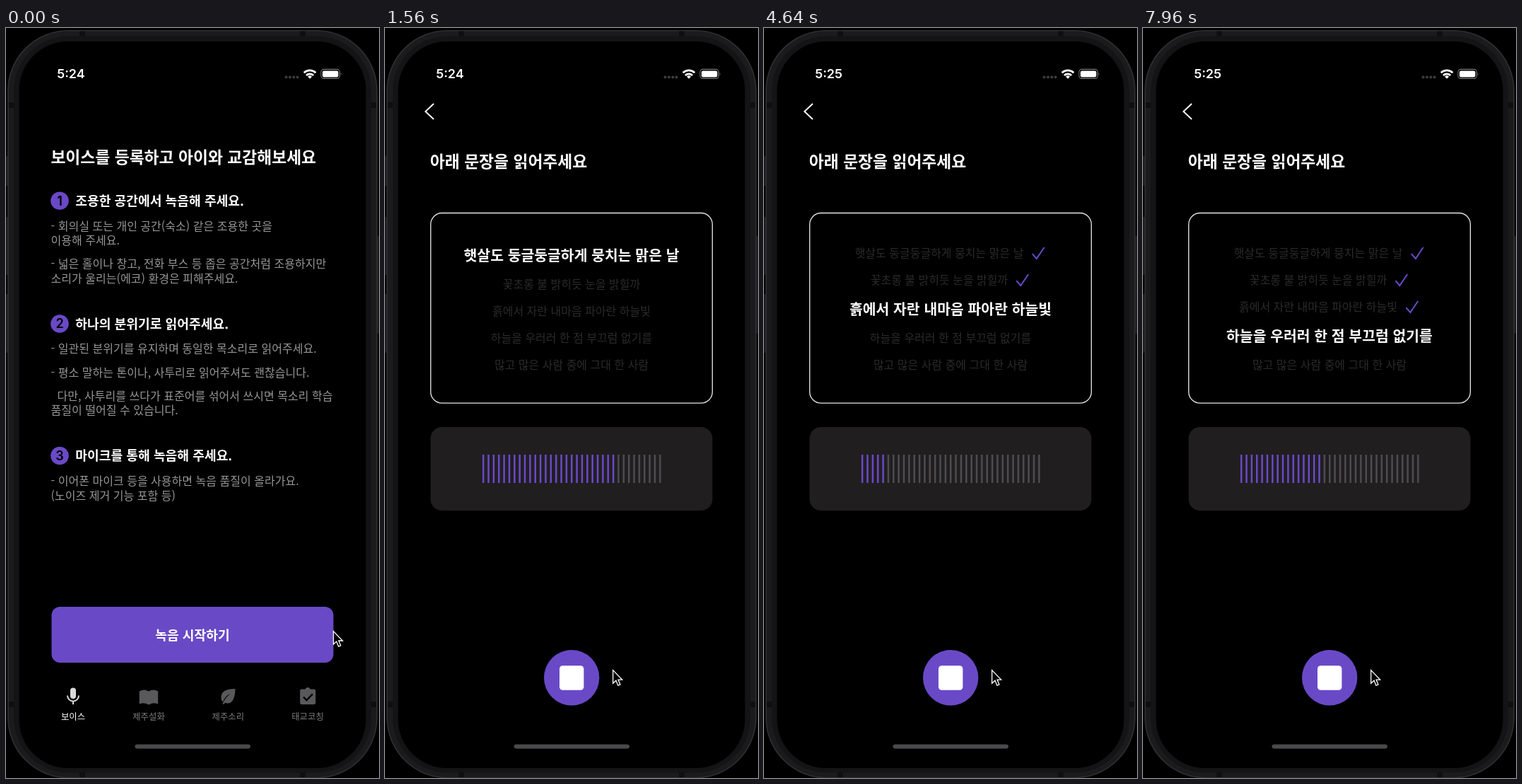
Animation of 528 by 1060 pixels, one loop 8000 ms. Source, as an HTML page:

```html
<!DOCTYPE html>
<html lang="ko">
<head>
<meta charset="utf-8">
<title>Voice recording</title>
<style>
html, body { margin: 0; width: 100%; height: 100%; overflow: hidden; background: #000; }
svg { display: block; width: 528px; height: 1060px; }
text { font-family: "Noto Sans CJK KR", "Noto Sans KR", "Noto Sans CJK", sans-serif; fill: #fff; }
.num { font-family: Inter, sans-serif; font-weight: 600; }
.title { font-size: 22.8px; font-weight: 700; }
.head { font-size: 18.2px; font-weight: 700; }
.body { font-size: 16.05px; fill: #969698; }
.tab { font-size: 12.4px; fill: #7c7c80; }
.mid { text-anchor: middle; }
</style>
</head>
<body>
<svg id="stage" viewBox="0 0 528 1060">
  <rect width="528" height="1060" fill="#000"/>
  <!-- phone body -->
  <g fill="#1b1a1d">
    <rect x="-2" y="182" width="5" height="40" stroke="#2c2b2e"/>
    <rect x="-2" y="268" width="5" height="80" stroke="#2c2b2e"/>
    <rect x="-2" y="377" width="5" height="81" stroke="#2c2b2e"/>
    <rect x="525" y="295" width="5" height="136" stroke="#2c2b2e"/>
    <rect x="3" y="3.7" width="522" height="1056" rx="85" stroke="#303033" stroke-width="1.6"/>
  </g>
  <g fill="#0f0e10">
    <path d="M104 4.5h8v8h-8zM416 4.5h8v8h-8zM104 1051h8v8h-8zM416 1051h8v8h-8z"/>
    <path d="M4 105h8v8h-8zM516 105h8v8h-8zM4 952h8v8h-8zM516 952h8v8h-8z"/>
  </g>
  <rect x="11" y="11.5" width="506" height="1041" rx="77" fill="#141315"/>
  <rect x="18.5" y="19" width="491" height="1027" rx="69" fill="#000"/>

  <!-- status bar -->
  <text id="clock" class="num" x="72.2" y="71.2" font-size="17.9"></text>
  <g fill="#3d3d40">
    <circle cx="396.6" cy="69.4" r="2"/><circle cx="402" cy="69.4" r="2"/>
    <circle cx="407.3" cy="69.4" r="2"/><circle cx="412.6" cy="69.4" r="2"/>
  </g>
  <g fill="none" stroke="#fff" stroke-width="2.7">
    <path d="M421.8 63.2a12 12 0 0 1 16.6 0"/>
    <path d="M425 66.9a7.4 7.4 0 0 1 10.2 0"/>
  </g>
  <path d="M430.1 71.8l-3-3.1a4.3 4.3 0 0 1 6 0z" fill="#fff"/>
  <rect x="446" y="58.4" width="26.4" height="13" rx="3.8" fill="none" stroke="#77777a" stroke-width="1.1"/>
  <rect x="448" y="60.4" width="22.4" height="9" rx="2.2" fill="#fff"/>
  <path d="M473.8 62.8q1.8 2.1 0 4.2z" fill="#77777a"/>
  <rect x="182.5" y="1012.4" width="163.5" height="6" rx="3" fill="#4a4a4c"/>

  <g id="guide">
    <text class="title" x="63.4" y="191.3">보이스를 등록하고 아이와 교감해보세요</text>
    <g id="tips"></g>
    <rect x="64.5" y="818" width="399" height="79" rx="12" fill="#6a49c7"/>
    <text class="head mid" x="264" y="864.8">녹음 시작하기</text>
    <g fill="#d9d9db">
      <rect x="91" y="932.5" width="8" height="15.5" rx="4"/>
      <path d="M87 943.5a8 8 0 0 0 16 0" fill="none" stroke="#d9d9db" stroke-width="2"/>
      <rect x="94" y="951" width="2" height="5"/>
    </g>
    <g fill="#59595c">
      <path d="M188.8 937.5q6.5-4 13.2 0q6.7-4 13.2 0v18q-6.6-3-13.2 1q-6.6-4-13.2-1z"/>
      <path d="M324.5 934c-13-.2-20 3.5-20 12.5q0 4 2.5 6q3-8.5 11-12q-7.5 5.5-11.5 14.5l2 1l1.5-2.5c11 4.5 14.5-8.5 14.5-19.5z"/>
      <path d="M418.5 934.5h5a4 4 0 0 1 7.4 0h5q2.3 0 2.3 2.3v17q0 2.3-2.3 2.3h-17.4q-2.3 0-2.3-2.3v-17q0-2.3 2.3-2.3z"/>
      <path d="M421 945.5l4.5 4.5l8.500-8.700" fill="none" stroke="#000" stroke-width="2.4"/>
    </g>
    <g class="mid">
      <text class="tab" x="95" y="978.2" style="fill:#fff">보이스</text>
      <text class="tab" x="202" y="978.2">제주설화</text>
      <text class="tab" x="314.3" y="978.2">제주소리</text>
      <text class="tab" x="427" y="978.2">태교코칭</text>
    </g>
  </g>

  <g id="record">
    <path d="M69 107L57.3 118L69 129" fill="none" stroke="#fff" stroke-width="1.9"/>
    <text class="title" x="63.8" y="196.5">아래 문장을 읽어주세요</text>
    <rect x="64.7" y="261.5" width="398.7" height="268.7" rx="16" fill="none" stroke="#e8e8e8" stroke-width="1.3"/>
    <g id="lines"></g>
    <rect x="64.5" y="564" width="399" height="118" rx="16" fill="#211e20"/>
    <g id="bars"></g>
    <circle cx="264.2" cy="918.3" r="39.2" fill="#6a49c7"/>
    <g id="recIcon">
      <circle cx="264.2" cy="918.3" r="18" fill="none" stroke="#fff" stroke-width="3.2"/>
      <circle cx="264.2" cy="918.3" r="7.6" fill="#fff"/>
    </g>
    <rect id="stopIcon" x="247" y="901.3" width="34.4" height="34.4" rx="4.5" fill="#fff"/>
  </g>

  <path id="cursor" d="M0 0V18.6L4.3 14.6L7.2 21.6L10.3 20.3L7.4 13.5H13Z" fill="#000" stroke="#fff" stroke-width="1.3"/>
</svg>
<script>
const LOOP = 8000, STEP = 40;
const PURPLE = '#6a49c7';
const $ = id => document.getElementById(id);

function add(parent, tag, attrs, text) {
  const el = document.createElementNS('http://www.w3.org/2000/svg', tag);
  for (const k in attrs) el.setAttribute(k, attrs[k]);
  if (text) el.textContent = text;
  return parent.appendChild(el);
}

const tips = [
  { y: 244.3, head: '조용한 공간에서 녹음해 주세요.', body: [
    [286, '- 회의실 또는 개인 공간(숙소) 같은 조용한 곳을'],
    [306, '이용해 주세요.'],
    [339, '- 넓은 홀이나 창고, 전화 부스 등 좁은 공간처럼 조용하지만'],
    [359.5, '소리가 울리는(에코) 환경은 피해주세요.']] },
  { y: 418, head: '하나의 분위기로 읽어주세요.', body: [
    [459.3, '- 일관된 분위기를 유지하며 동일한 목소리로 읽어주세요.'],
    [492.5, '- 평소 말하는 톤이나, 사투리로 읽어주셔도 괜찮습니다.'],
    [525.5, '\u00a0\u00a0다만, 사투리를 쓰다가 표준어를 섞어서 쓰시면 목소리 학습'],
    [546, '품질이 떨어질 수 있습니다.']] },
  { y: 604.5, head: '마이크를 통해 녹음해 주세요.', body: [
    [646, '- 이어폰 마이크 등을 사용하면 녹음 품질이 올라가요.'],
    [666.5, '(노이즈 제거 기능 포함 등)']] }
];
tips.forEach((tip, i) => {
  add($('tips'), 'circle', { cx: 76, cy: tip.y, r: 12.8, fill: PURPLE });
  add($('tips'), 'text', { x: 76, y: tip.y + 6.4, class: 'num mid', 'font-size': 18, style: 'fill:#000' }, String(i + 1));
  add($('tips'), 'text', { x: 98.3, y: tip.y + 6.8, class: 'head' }, tip.head);
  tip.body.forEach(([y, s]) => add($('tips'), 'text', { x: 63.6, y, class: 'body' }, s));
});

// each sentence with half its width when dimmed
const rows = [
  ['햇살도 둥글둥글하게 뭉치는 맑은 날', 119.5],
  ['꽃초롱 불 밝히듯 눈을 밝힐까', 97],
  ['흙에서 자란 내마음 파아란 하늘빛', 112],
  ['하늘을 우러러 한 점 부끄럼 없기를', 114],
  ['많고 많은 사람 중에 그대 한 사람', 108.5]
].map(([s, half], i) => ({
  text: add($('lines'), 'text', { class: 'mid' }, s),
  check: add($('lines'), 'path', {
    d: `M${260.4 + half} ${319.2 + 38 * i}l6 6.800l10.800-16`,
    fill: 'none', stroke: PURPLE, 'stroke-width': 2
  })
}));

const bars = Array.from({ length: 35 }, (_, i) =>
  add($('bars'), 'rect', { x: 137.9 + 7.36 * i, y: 603, width: 2.5, height: 40 }));

const level = [
  [920, 0], [1080, 6], [1240, 20], [1400, 10], [1560, 26], [1720, 12],
  [1880, 28], [2040, 18], [2200, 30], [2360, 12], [2520, 4], [2640, 4],
  [2720, 0], [2840, 18], [3000, 34], [3160, 20], [3320, 28], [3480, 12],
  [3720, 8], [3880, 24], [4040, 33], [4200, 16], [4400, 10], [4640, 5],
  [4800, 18], [4960, 28], [5160, 8], [5320, 5], [5480, 16], [5640, 24],
  [5800, 12], [5960, 20], [6040, 25], [6200, 30], [6400, 14], [6600, 10],
  [6840, 5], [7000, 18], [7160, 31], [7360, 16], [7520, 24], [7680, 8],
  [7800, 25], [7960, 16]
];
const path = [
  [0, 463.5, 852.5], [240, 330, 866], [400, 326, 870], [720, 274.5, 915.5],
  [1160, 274.5, 915.5], [1520, 322.7, 907.6]
];

const clamp = v => Math.max(0, Math.min(1, v));
const ease = v => v * v * (3 - 2 * v);

function track(keys, t, col, curve = v => v) {
  let i = 0;
  while (i < keys.length - 2 && t >= keys[i + 1][0]) i++;
  const a = keys[i], b = keys[i + 1];
  return a[col] + (b[col] - a[col]) * curve(clamp((t - a[0]) / (b[0] - a[0])));
}

function show(el, on) { el.setAttribute('visibility', on ? 'inherit' : 'hidden'); }

function drawLines(active) {
  rows.forEach(({ text, check }, i) => {
    const on = i === active, done = i < active;
    const y = 38 * i + (on ? 328.6 : done ? 324.1 : 329.5);
    text.setAttribute('x', done ? 248 : 264);
    text.setAttribute('y', y);
    text.setAttribute('style', on
      ? 'font-size:20.45px;font-weight:700'
      : 'font-size:16px;fill:#2b2a2c');
    show(check, done);
  });
}

function draw(t) {
  $('clock').textContent = t < 4000 ? '5:24' : '5:25';

  const p = clamp((t - 240) / 280), e = ease(p);
  $('guide').setAttribute('transform', `translate(${-30 * e})`);
  $('guide').setAttribute('opacity', 1 - p);
  $('record').setAttribute('transform', `translate(${30 * (1 - e)})`);
  $('record').setAttribute('opacity', p);

  drawLines([2240, 4480, 6440].filter(at => t >= at).length);

  const lit = Math.round(track(level, t, 1));
  bars.forEach((bar, i) => bar.setAttribute('fill', i < lit ? PURPLE : '#4d4c4f'));

  const recording = t >= 920;
  show($('recIcon'), !recording);
  show($('stopIcon'), recording);

  const x = track(path, t, 1, ease), y = track(path, t, 2, ease);
  $('cursor').setAttribute('transform', `translate(${x} ${y})`);
}

function tick() {
  const t = performance.now() % LOOP;
  draw(Math.floor(t / STEP) * STEP);
  requestAnimationFrame(tick);
}
draw(0);
requestAnimationFrame(tick);
</script>
</body>
</html>
```
